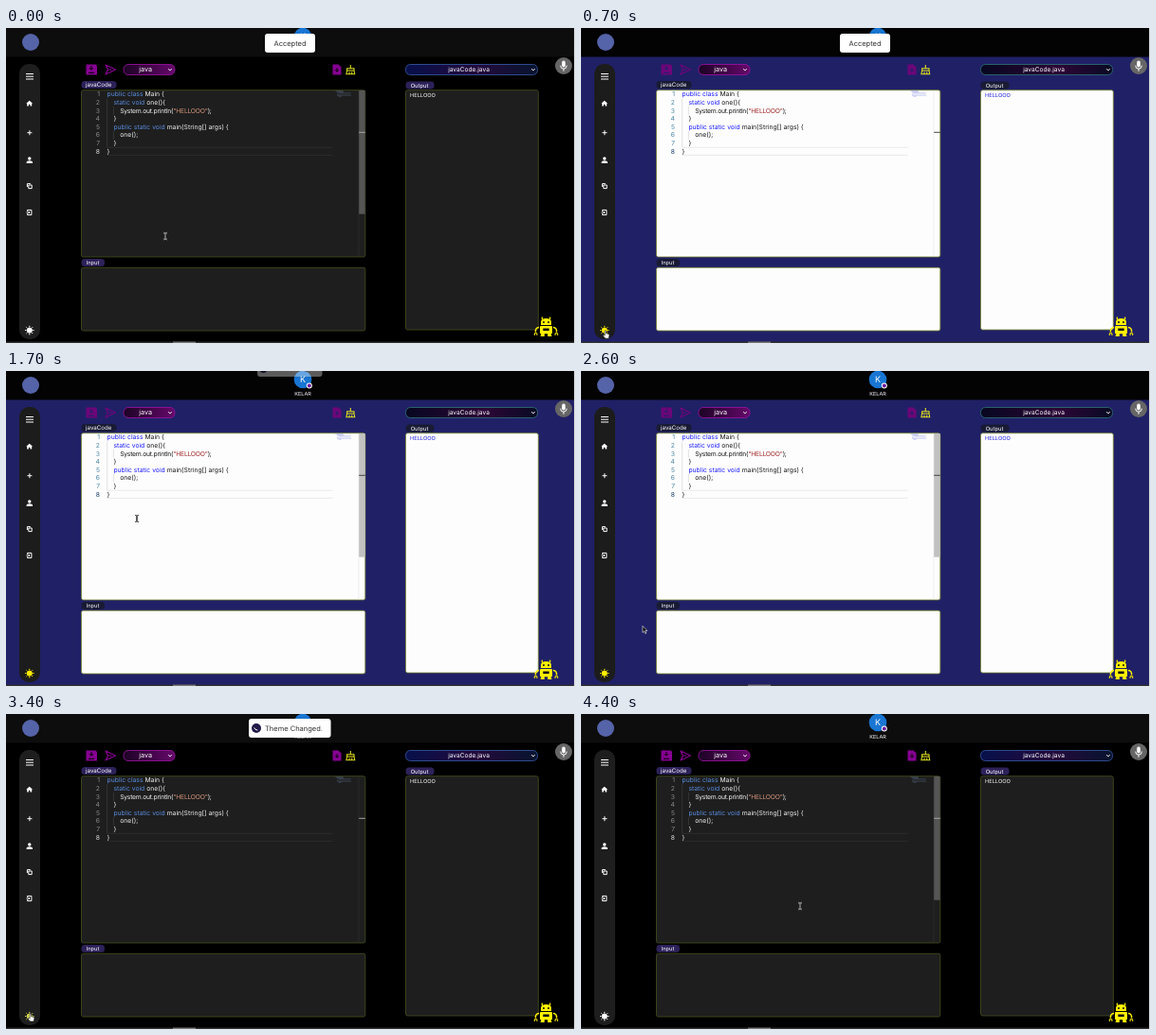
Recreate the animation shown at these times as an HTML page. Size 600 by 333 pixels, loop 4500 ms.

```html
<!DOCTYPE html>
<html lang="en">
<head>
<meta charset="utf-8">
<title>Code editor theme switch</title>
<style>
html, body { margin: 0; width: 100%; height: 100%; overflow: hidden; background: #000; }
svg { display: block; width: 100%; height: 100%; font-family: Inter, "Open Sans", sans-serif; }
text { white-space: pre; text-rendering: geometricPrecision; }
#stage {
  --bg: #000; --head: #0d0d0d; --side: #1e1e1e; --panel: #1e1e1e; --edge: #46521c;
  --text: #f2f2f2; --key: #5a8de0; --str: #ce9178; --num: #8a8a8a; --active: #e0e0e0;
  --out: #f2f2f2; --guide: #454545; --rule: #303030; --bar: #555; --mark: #a5a5a5;
  --tag: #2d2159; --tool: #860092; --pill: url(#pillDark); --pillEdge: #34539b; --map: #56657c;
}
#stage.light {
  --bg: #202067; --head: #030303; --side: #1c1c1c; --panel: #fdfdfd; --edge: #77862f;
  --text: #151515; --key: #1a1aff; --str: #a33030; --num: #4a86a5; --active: #173a6a;
  --out: #2a2ae0; --guide: #d0d0d0; --rule: #e6e6e6; --bar: #c1c1c1; --mark: #444;
  --tag: #191b35; --tool: #6d0679; --pill: url(#pillLight); --pillEdge: #2c6b70; --map: #8e94e8;
}
.panel { fill: var(--panel); stroke: var(--edge); stroke-width: .8; }
.tag rect { fill: var(--tag); }
.tag text { fill: #fff; }
.code { font-size: 6.8px; fill: var(--text); }
.k { fill: var(--key); }
.s { fill: var(--str); }
.n { fill: var(--num); text-anchor: end; }
.n.on { fill: var(--active); }
.w { fill: #fff; }
.line { fill: none; stroke: #fff; stroke-width: 1; }
.tool { fill: var(--tool); }
.mid { text-anchor: middle; }
</style>
</head>
<body>
<svg id="stage" viewBox="0 0 600 333" preserveAspectRatio="none">
  <defs>
    <linearGradient id="selectFill"><stop stop-color="#1c0324"/><stop offset="1" stop-color="#65086a"/></linearGradient>
    <linearGradient id="pillDark"><stop stop-color="#07104a"/><stop offset=".55" stop-color="#240a3c"/><stop offset="1" stop-color="#06142e"/></linearGradient>
    <linearGradient id="pillLight"><stop stop-color="#070720"/><stop offset=".6" stop-color="#2c0636"/><stop offset="1" stop-color="#080a24"/></linearGradient>
    <filter id="soft" x="-20%" y="-40%" width="140%" height="200%"><feDropShadow dx="0" dy="1" stdDeviation="1.5" flood-opacity=".25"/></filter>
  </defs>

  <rect width="600" height="333" style="fill:var(--bg)"/>
  <rect width="600" height="30.5" style="fill:var(--head)"/>
  <circle cx="26" cy="15" r="9" fill="#5563a8"/>

  <g id="avatar">
    <circle cx="313" cy="9" r="9.3" fill="#1976d2"/>
    <text class="mid w" x="313" y="12" font-size="9">K</text>
    <circle cx="319.8" cy="15.6" r="3" fill="#fff"/>
    <circle cx="319.8" cy="15.6" r="2" fill="#6a1b9a"/>
    <text class="mid w" x="313" y="26" font-size="5.5">KELAR</text>
  </g>

  <!-- sidebar -->
  <rect x="14" y="38" width="22" height="291" rx="10" style="fill:var(--side)"/>
  <path class="line" stroke-width="1.2" d="M21 48.5h8M21 51.2h8M21 54h8"/>
  <path class="w" d="M24.7 76.8l3.4 3h-.9v2.8h-1.7v-1.8h-1.6v1.8h-1.7v-2.8h-.9z"/>
  <path class="line" d="M22.4 110.7h5M24.9 108.2v5"/>
  <g class="w"><circle cx="24.8" cy="138" r="1.7"/><path d="M21.6 143v-1q0-1.8 3.2-1.8t3.2 1.8v1z"/></g>
  <path class="line" stroke-width=".8" d="M22.4 168v-3.4h3.4M23.8 166h3.4v3.6h-3.4z"/>
  <path class="line" stroke-width=".8" d="M22.5 193.8v-1.4h4.4v5.2h-4.4v-1.4M21.6 195h3.4m-1.2-1.2l1.2 1.2l-1.2 1.2"/>
  <g id="sun">
    <circle cx="24.8" cy="319.6" r="2.6"/>
    <path id="rays" stroke-width="1" fill="none"/>
  </g>

  <!-- toolbar -->
  <g class="tool">
    <path d="M85 38.5h9.5l1.5 1.5v9.5h-11.5v-10.5z"/>
    <path d="M90 40v4m-2-1.8l2 2l2-2M87 47.3h6" fill="none" style="stroke:var(--bg)" stroke-width="1"/>
    <path d="M105 39l10.5 5l-10.5 5l2.5-5zM107.5 44h4" style="fill:none;stroke:var(--tool)" stroke-width="1.2" stroke-linejoin="round"/>
    <path d="M344.5 38.5h6l3 3v8h-9z"/>
    <path d="M349 42v4m-2-1.8l2 2l2-2" fill="none" style="stroke:var(--bg)" stroke-width="1"/>
  </g>
  <path d="M363.3 39v3.6M359.6 42.7h7.4v2.3h-7.4zM359.6 45l-.7 3.7h8.8l-.7-3.7M362 46.5v2M364.7 46.5v2" fill="none" stroke="#dede20" stroke-width="1.1"/>
  <rect x="124" y="38.5" width="54" height="11" rx="5" fill="url(#selectFill)" stroke="#95129a" stroke-width=".9"/>
  <text class="mid w" x="147.2" y="46.3" font-size="7.2">java</text>
  <path class="line" stroke-width=".8" d="M171.3 43.2l1.7 1.7l1.7-1.7"/>
  <rect x="421.5" y="38.5" width="139" height="11" rx="5" style="fill:var(--pill);stroke:var(--pillEdge)" stroke-width=".9"/>
  <text class="mid w" x="488" y="46.3" font-size="6.6">javaCode.java</text>
  <path class="line" stroke-width=".8" d="M554.3 43.2l1.7 1.7l1.7-1.7"/>
  <circle cx="588" cy="40" r="9" fill="#666"/>
  <rect class="w" x="586.2" y="34.6" width="3.6" height="7" rx="1.8"/>
  <path class="line" d="M584.7 39.6q0 3.6 3.3 3.6t3.3-3.6M588 43.2v2.5"/>

  <!-- panels -->
  <g class="tag">
    <rect x="79.5" y="56" width="37" height="8" rx="3.5"/><text x="84" y="62.2" font-size="6.2">javaCode</text>
    <rect x="79.5" y="244" width="24.5" height="8" rx="3.5"/><text x="84.7" y="250.1" font-size="5.7">Input</text>
    <rect x="421.5" y="56.5" width="30" height="8" rx="3.5"/><text x="426.7" y="62.7" font-size="5.8">Output</text>
  </g>
  <rect class="panel" x="79.5" y="65.7" width="299.3" height="176.3" rx="2"/>
  <rect class="panel" x="79.5" y="253.3" width="299.3" height="66.7" rx="2"/>
  <rect class="panel" x="421.5" y="65.7" width="139.8" height="253.3" rx="2"/>
  <text x="426" y="73.3" font-size="5.7" style="fill:var(--out)">HELLOOO</text>

  <path d="M106.7 74.5v51.5M113.4 83v8.7M113.4 109v8.7" fill="none" style="stroke:var(--guide)" stroke-width=".6"/>
  <path d="M106.5 126.3h238M106.5 134.4h238" fill="none" style="stroke:var(--rule)" stroke-width=".8"/>
  <g id="code" class="code"></g>
  <path d="M347.5 66.7h8M349 67.8h7M350.5 68.9h13M349 70h1M349 71.1h15M350.5 72.2h3" fill="none" style="stroke:var(--map)" stroke-width=".7" opacity=".8"/>
  <path d="M372 66v175.5" style="stroke:var(--rule)" stroke-width=".6"/>
  <rect id="scroll" x="372.2" y="66" width="6.4" height="130.7" style="fill:var(--bar)"/>
  <path d="M372.2 110.3h6.6" style="stroke:var(--mark)" stroke-width="1"/>

  <!-- assistant button -->
  <g fill="#fff200" stroke="#fff200">
    <path d="M565.3 308v-2.5M573.7 308v-2.5" stroke-width="1.2"/>
    <path d="M564 314v-3q0-4 5.5-4t5.5 4v3z" stroke="none"/>
    <rect x="563" y="315" width="13" height="8.3" rx="1" stroke="none"/>
    <path d="M562 316.5q-4 .3-3.6 5M577 316.5q4 .3 3.6 5" fill="none" stroke-width="1.5"/>
    <path d="M557.3 325v-2.3h2.6v2.3M579.1 325v-2.3h2.6v2.3" fill="none" stroke-width="1"/>
    <path d="M564.5 322.5h3.3v3.5h-4.3zM571.2 322.5h3.3l1 3.5h-4.3z" stroke="none"/>
    <g fill="#111" stroke="none"><circle cx="567" cy="311" r="1"/><circle cx="572" cy="311" r="1"/><rect x="566.3" y="317.5" width="6.4" height="2.6"/></g>
  </g>

  <rect y="331.6" width="600" height="1.4" fill="#303030"/>
  <rect x="176" y="331.6" width="24" height="1.4" fill="#777"/>
  <rect x="599" width="1" height="333" fill="#d5d5d5"/>

  <g id="accepted">
    <rect x="273" y="6" width="53" height="20" rx="3" fill="#fff" filter="url(#soft)"/>
    <text class="mid" x="299.5" y="18.8" font-size="7.5" fill="#333">Accepted</text>
  </g>
  <g id="changed">
    <rect x="256" y="5" width="86.5" height="20" rx="3" fill="#fff" filter="url(#soft)"/>
    <circle cx="264" cy="15" r="5" fill="#211a48"/>
    <path class="line" stroke-width=".9" d="M261.7 14.5q.8 2.5 3.6 2.6"/>
    <text x="273" y="17.7" font-size="7.5" fill="#333">Theme Changed.</text>
  </g>

  <g id="ibeam" fill="none">
    <path d="M-1.9-3.6q1.9 0 1.9 1v5.2q0 1-1.9 1M1.9-3.6q-1.9 0-1.9 1v5.2q0 1 1.9 1" stroke="#fff" stroke-width="1.5"/>
    <path id="beamInk" d="M-1.9-3.6q1.9 0 1.9 1v5.2q0 1-1.9 1M1.9-3.6q-1.9 0-1.9 1v5.2q0 1 1.9 1" stroke-width=".8"/>
  </g>
  <path id="arrow" d="M-1-3.5v7l1.6-1.5l1.2 2.6l1.1-.5l-1.2-2.5h2.2z" fill="#000" stroke="#fff" stroke-width=".6"/>
  <path id="hand" d="M-.9-3q.9-.9 1.4 0v2.7l2.6.6q1 .3.8 1.4l-.7 3.3h-3.5l-2.6-3q0-1 1.1-.7l.9.7z" fill="#fff" stroke="#111" stroke-width=".6"/>
</svg>
<script>
const LOOP = 4500, STEP = 100, LIGHT_ON = 700, LIGHT_OFF = 3400;
const $ = id => document.getElementById(id);
const k = s => `<tspan class="k">${s}</tspan>`;

const lines = [
  [0, k('public class') + ' Main {'],
  [1, k('static void') + ' one(){'],
  [2, 'System.out.println(<tspan class="s">"HELLOOO"</tspan>);', -.25],
  [1, '}'],
  [1, k('public static void') + ' main(String[] args) {'],
  [2, 'one();'],
  [1, '}'],
  [0, '}']
];
$('code').innerHTML = lines.map(([indent, html, gap = 0], i) => {
  const y = 72.3 + i * 8.63;
  return `<text class="n ${i === 7 ? 'on' : ''}" x="99" y="${y}">${i + 1}</text>` +
    `<text x="${106.6 + indent * 6.8}" y="${y}" letter-spacing="${gap}">${html}</text>`;
}).join('');

$('rays').setAttribute('d', Array.from({ length: 8 }, (_, i) => {
  const c = Math.cos(i * Math.PI / 4), s = Math.sin(i * Math.PI / 4);
  return `M${24.8 + 3.4 * c} ${319.6 + 3.4 * s}L${24.8 + 4.8 * c} ${319.6 + 4.8 * s}`;
}).join(''));

// time, x, y
const path = [
  [0, 168, 220], [300, 92, 276], [600, 26, 323], [1200, 26, 324], [1700, 138, 156],
  [2100, 150, 160], [2600, 66, 273], [3000, 26, 323], [3300, 26, 323], [3400, 26, 320],
  [3500, 26, 320], [3700, 58, 294], [4100, 180, 222], [4400, 231, 203], [4500, 231, 203]
];
// time, opacity
const scrollFade = [[0, 1], [300, 1], [500, 0], [1400, 0], [1500, 1], [2600, 1], [2800, 0], [3900, 0], [4000, 1], [4500, 1]];

function at(table, t) {
  const i = Math.max(1, table.findIndex(row => row[0] >= t));
  const a = table[i - 1], b = table[i];
  const p = (t - a[0]) / (b[0] - a[0]);
  return a.slice(1).map((v, j) => v + (b[j + 1] - v) * p);
}

// A toast lifts, shrinks and fades as it leaves.
function toast(id, t, from, leave, cx, cy) {
  const p = Math.min(1, Math.max(0, (t - leave) / 200));
  const el = $(id);
  el.style.display = t >= from && p < 1 ? '' : 'none';
  el.setAttribute('opacity', 1 - 1.3 * p > 0 ? 1 - 1.3 * p : 0);
  el.setAttribute('transform', `translate(${cx} ${cy - 34 * p}) scale(${1 - .42 * p}) translate(${-cx} ${-cy})`);
}

function pointer(t, light) {
  const [x, y] = at(path, t);
  const overText = x > 79 && x < 379 && ((y > 65 && y < 242) || (y > 253 && y < 320));
  const overSun = Math.abs(x - 25) < 6 && y > 314;
  const kind = overText ? 'ibeam' : overSun ? 'hand' : 'arrow';
  for (const id of ['ibeam', 'arrow', 'hand']) {
    $(id).style.display = id === kind ? '' : 'none';
    $(id).setAttribute('transform', `translate(${x} ${y})`);
  }
  $('beamInk').setAttribute('stroke', light ? '#000' : '#333');
  return overSun;
}

function draw(now) {
  const t = Math.floor(now % LOOP / STEP) * STEP;
  const light = t >= LIGHT_ON && t < LIGHT_OFF;
  $('stage').classList.toggle('light', light);
  const hover = pointer(t, light);
  const sun = light ? '#ffee00' : hover && t >= LIGHT_OFF ? '#dcdc55' : '#fff';
  $('sun').setAttribute('fill', sun);
  $('sun').setAttribute('stroke', sun);
  $('scroll').setAttribute('opacity', at(scrollFade, t)[0]);
  toast('accepted', t, 0, 700, 299.5, 16);
  if (t < LIGHT_OFF) toast('changed', t, 800, 1600, 299.3, 15);
  else toast('changed', t, LIGHT_OFF, 4200, 299.3, 15);
}

function tick() {
  draw(performance.now());
  requestAnimationFrame(tick);
}
tick();
</script>
</body>
</html>
```
